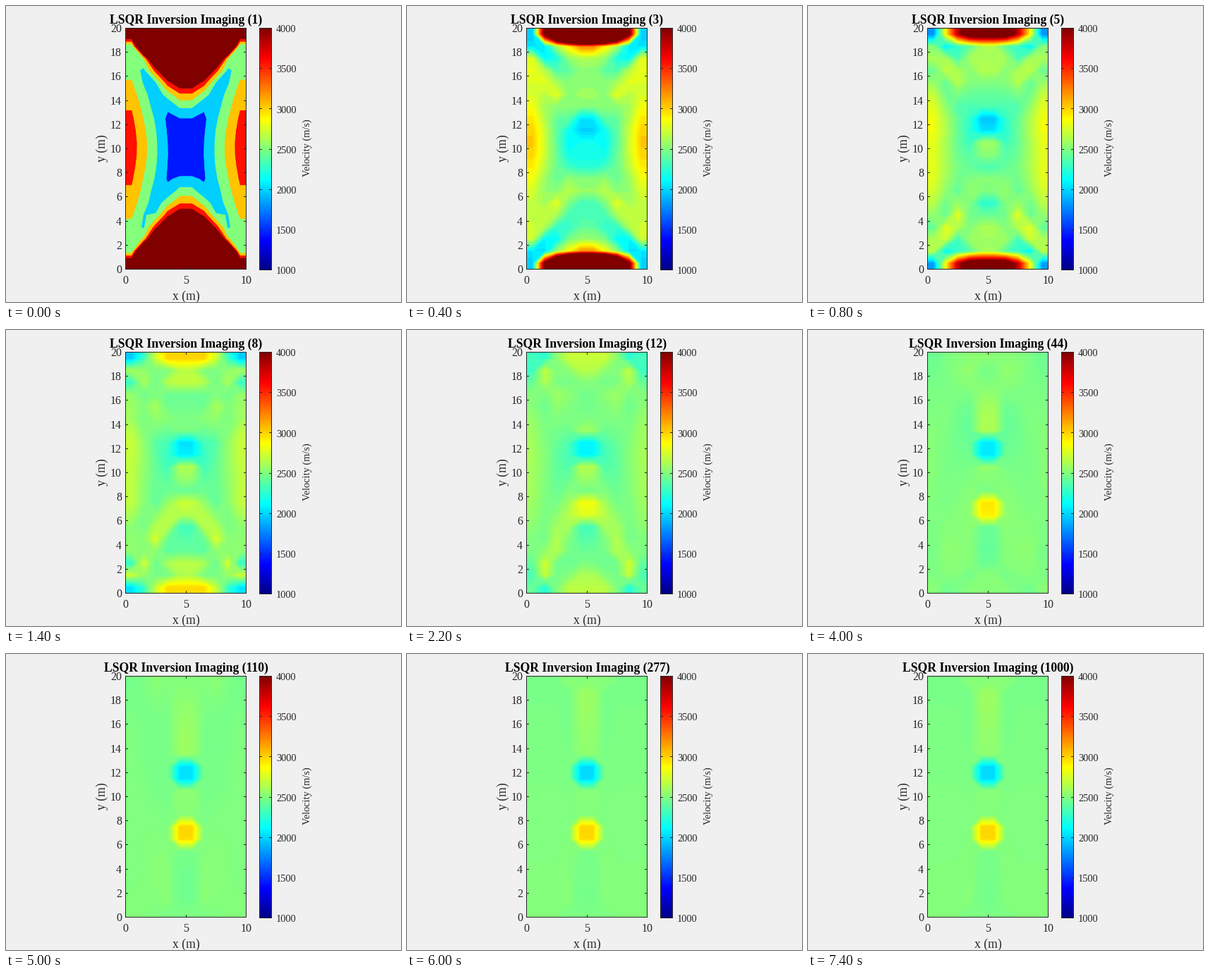
Write a matplotlib script that moves like this. It is 560x420 px and loops after 7600 ms.

```python
"""Cross-hole travel-time tomography: LSQR iterates as filled contours."""
import numpy as np
import matplotlib.pyplot as plt
from matplotlib.animation import FuncAnimation

W, H, DPI = 560, 420, 100
NX, NY = 10, 20
FRAMES, STEP_MS = 38, 200
LEVELS = 100
VMIN, VMAX = 1000, 4000
LEFT, RIGHT, TOP, BOTTOM = 169.5, 340.5, 31.5, 373.5
BAR_L, BAR_R, BAR_BOTTOM = 359.5, 376.5, 374.5
INK = "#262626"


def ray_lengths(y0, y1):
    """Length of a straight ray from (0, y0) to (NX, y1) in every cell."""
    cuts = np.arange(NX + 1) / NX
    if y0 != y1:
        t = (np.arange(NY + 1) - y0) / (y1 - y0)
        cuts = np.append(cuts, t[(t > 0) & (t < 1)])
    cuts = np.sort(cuts)
    mid = (cuts[1:] + cuts[:-1]) / 2
    col = np.clip((mid * NX).astype(int), 0, NX - 1)
    row = np.clip((y0 + mid * (y1 - y0)).astype(int), 0, NY - 1)
    cells = np.zeros((NY, NX))
    np.add.at(cells, (row, col), np.diff(cuts) * np.hypot(NX, y1 - y0))
    return cells.ravel()


def unit(v):
    size = np.linalg.norm(v)
    return v / size, size


def lsqr(A, b, wanted):
    """Return the LSQR iterates, started from zero, at the wanted counts."""
    u, phibar = unit(b)
    v, alpha = unit(A.T @ u)
    w, x = v, np.zeros(A.shape[1])
    rhobar, tol = alpha, 1e-9 * phibar
    kept = {}
    for k in range(1, max(wanted) + 1):
        if phibar > tol:
            u, beta = unit(A @ v - alpha * u)
            v, alpha = unit(A.T @ u - beta * v)
            rho = np.hypot(rhobar, beta)
            c, s = rhobar / rho, beta / rho
            x = x + c * phibar / rho * w
            w = v - s * alpha / rho * w
            rhobar, phibar = -c * alpha, s * phibar
        if k in wanted:
            kept[k] = x
    return kept


def jet_table(n=256):
    i = np.arange(1, n + 1)
    q = n // 4

    def ramp(j):
        return np.clip(np.minimum(j, 3 * q - j) / q, 0, 1)

    return np.column_stack([ramp(i - 96), ramp(i - 32), ramp(i + 32)])


JET = jet_table()


def jet(v):
    k = np.floor((v - VMIN) / (VMAX - VMIN) * 256)
    return JET[np.clip(k, 0, 255).astype(int)]


# Background 2500 m/s with one slow and one fast block
speed = np.full((NY, NX), 2500.0)
speed[11:13, 4:6] = 2000
speed[6:8, 4:6] = 3000
depths = np.arange(NY) + 0.5
A = np.array([ray_lengths(a, b) for a in depths for b in depths])
counts = [max(i + 1, int(1000 * np.exp(-0.1832 * (FRAMES - 1 - i))))
          for i in range(FRAMES)]
models = lsqr(A, A @ (1 / speed.ravel()), set(counts))

fig = plt.figure(figsize=(W / DPI, H / DPI), dpi=DPI, facecolor="#f0f0f0")
ax = fig.add_axes([0, 0, 1, 1])
ax.set_xlim(0, W)
ax.set_ylim(H, 0)
ax.axis("off")


def px(x):
    return LEFT + np.asarray(x) * (RIGHT - LEFT) / NX


def py(y):
    return BOTTOM - np.asarray(y) * (BOTTOM - TOP) / NY


def line(xs, ys):
    ax.plot(xs, ys, color=INK, lw=72 / DPI, zorder=4, snap=False,
            solid_capstyle="projecting", solid_joinstyle="miter")


def label(x, y, s, size, ha="center", color=INK, **kw):
    return ax.text(x, y, s, fontsize=size * 72 / DPI, ha=ha, va="baseline",
                   color=color, family="Liberation Serif", zorder=5, **kw)


def frame_box(left, right, bottom):
    line([left, right, right, left, left], [TOP, TOP, bottom, bottom, TOP])


def side_ticks(left, right, y):
    y = np.floor(y) + 0.5
    line([left, left + 3], [y, y])
    line([right - 3, right], [y, y])


frame_box(LEFT, RIGHT, BOTTOM)
for x in (0, 5, 10):
    tick = np.floor(px(x)) + 0.5
    line([tick, tick], [BOTTOM - 3, BOTTOM])
    line([tick, tick], [TOP, TOP + 3])
    label(px(x), 394, str(x), 16)
for y in range(0, NY + 1, 2):
    side_ticks(LEFT, RIGHT, py(y))
    label(164, py(y) + 5.5, str(y), 16, ha="right")

ax.imshow(JET[::-1][:, None], aspect="auto", interpolation="nearest", zorder=1,
          extent=(BAR_L + 0.5, BAR_R + 0.5, BAR_BOTTOM + 0.5, TOP - 0.5))
frame_box(BAR_L, BAR_R, BAR_BOTTOM)
for v in range(VMIN, VMAX + 1, 500):
    y = BAR_BOTTOM - (v - VMIN) / (VMAX - VMIN) * (BAR_BOTTOM - TOP)
    side_ticks(BAR_L, BAR_R, y)
    label(383, y + 5.7, str(v), 14.4, ha="left")

upright = dict(rotation=90, rotation_mode="anchor")
label(255, 417, "x (m)", 17.6)
label(140.5, 202, "y (m)", 17.6, **upright)
label(431, 201.5, "Velocity (m/s)", 14.4, **upright)
title = label(255.5, 25, "", 17.6, color="black", weight="bold")

# Cell centres, with the outer cells carried to the edges
gx = px(np.concatenate([[0], np.arange(NX) + 0.5, [NX]]))
gy = py(np.concatenate([[0], np.arange(NY) + 0.5, [NY]]))
shown = []


def update(i):
    while shown:
        shown.pop().remove()
    n = counts[i]
    v = np.pad(1 / models[n].reshape(NY, NX), 1, mode="edge")
    levels = np.linspace(v.min(), v.max(), LEVELS + 2)
    # The hard-edged layer below closes the seams of the smooth one
    for smooth in (False, True):
        shown.append(ax.contourf(gx, gy, v, levels=levels, zorder=2 + smooth,
                                 colors=jet(levels[:-1]), antialiased=smooth))
    title.set_text(f"LSQR Inversion Imaging ({n})")
    return [title]


anim = FuncAnimation(fig, update, frames=FRAMES, interval=STEP_MS,
                     repeat=True, repeat_delay=0, blit=False)
plt.show()
```
